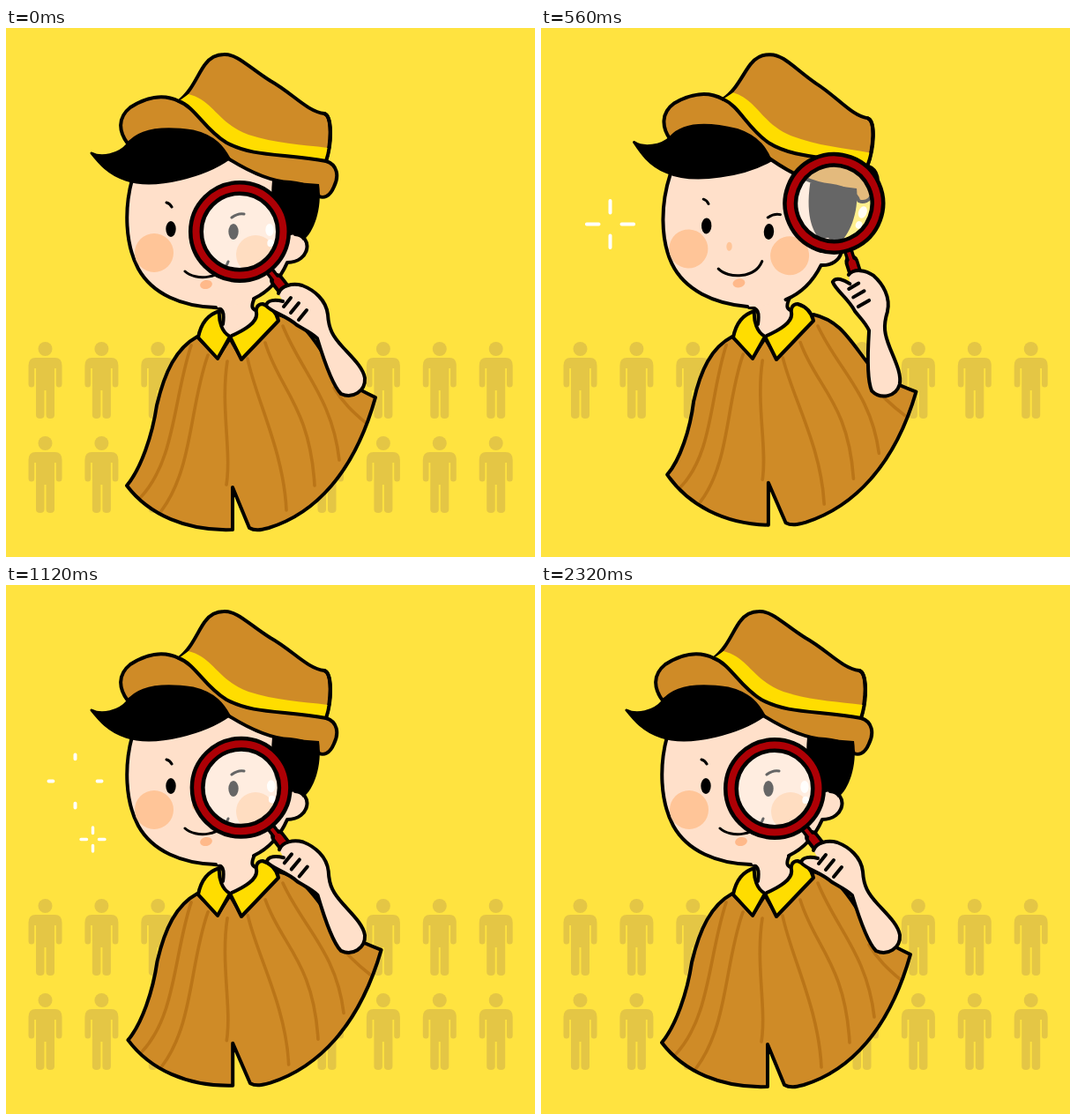
Write an HTML page that moves like this. It is 600 px wide and 600 px high and loops after 3.2 s.

```html
<!DOCTYPE html>
<html lang="en">
<head>
<meta charset="utf-8">
<title>Detective with magnifying glass</title>
<style>
  html, body { margin: 0; width: 100%; height: 100%; overflow: hidden; background: #ffe340; }
  svg { display: block; width: 100vw; height: 100vh; }
  .ink { stroke: #000; stroke-width: 4; stroke-linejoin: round; stroke-linecap: round; }
  .line { fill: none; }
  .thin { stroke-width: 3; }
  .tan { fill: #cf8b27; }
  .skin { fill: #ffe0ca; }
  .gold { fill: #ffdd00; }
  .blush { fill: #ffc598; }
  .stripe { fill: none; stroke: #ba7518; stroke-width: 3.6; stroke-linecap: round; }
  .spark { stroke: #fff; fill: none; stroke-linecap: round; }
</style>
</head>
<body>
<svg viewBox="0 0 600 600">
  <defs>
    <g id="man" fill="#e4c645">
      <circle cy="8" r="8"/>
      <path d="M-11 18 H11 Q19 18 19 27 V48 Q19 51.500 15.500 51.500 Q12.300 51.500 12.300 48 V30 H10.500 V83 Q10.500 87 5.700 87 Q1 87 1 83 V55 H-1 V83 Q-1 87 -5.700 87 Q-10.500 87 -10.500 83 V30 H-12.300 V48 Q-12.300 51.500 -15.500 51.500 Q-19 51.500 -19 48 V27 Q-19 18 -11 18 Z"/>
    </g>
    <g id="row"></g>
  </defs>

  <use id="rowA" href="#row"/>
  <use id="rowB" href="#row" y="463"/>
  <path id="spark1" class="spark" stroke-width="4"/>
  <path id="spark2" class="spark" stroke-width="3.400"/>

  <g id="cloak"></g>

  <path class="skin" d="M238 312 L247 320 L245 338 L254 352 L287 328 L280 318 L283 300 Z"/>
  <path class="ink line" d="M236 317 C246 317 248 322 246 336 M282 306 C277 317 279 319 287 322"/>
  <path class="ink gold" d="M242 321 C229 325 221 335 218 351 L240 375 L254 350 C245 345 241 333 242 321 Z"/>
  <path class="ink gold" d="M254 350 C270 343 286 334 284 323 C283 317 286 313 291 313 C301 316 307 323 309 332 L267 376 Z"/>

  <g id="face">
    <path class="skin" d="M143 170 C134 205 135 245 150 273 C166 302 200 317 240 317 C270 316 306 300 319 266 C345 266 349 236 328 234 L330 160 L200 125 Z"/>
    <path class="ink line" d="M143 172 C134 205 135 245 150 273 C166 302 200 316 238 317 M281 307 C300 298 312 282 319 266 C345 266 349 236 328 234"/>
    <circle class="blush" cx="168" cy="255" r="22"/>
    <circle class="blush" cx="283" cy="257" r="22"/>
    <ellipse class="blush" cx="214" cy="250" rx="3.200" ry="5"/>
    <ellipse cx="227" cy="291" rx="7" ry="5" fill="#ffb98a" transform="rotate(-12 227 291)"/>
    <ellipse cx="187" cy="228" rx="5.700" ry="9"/>
    <ellipse cx="258" cy="231" rx="5.700" ry="9"/>
    <path class="ink line thin" d="M182 198 Q186 199 188 203 M256 215 C260 212 265 210 270 211 M203 276 C215 287 245 285 252 265"/>
  </g>

  <g id="hat">
    <path class="ink tan" d="M138 131 C128 118 126 102 141 90 C158 79 178 74 196 83 C211 72 218 51 226 41 C232 33 239 30 247 30 C262 29 276 45 300 60 C325 74 342 95 361 97 C370 100 369 130 363 151 C376 155 378 168 372 180 C367 192 360 193 355 191 C352 182 340 177 322 175 C295 174 268 158 252 148 C230 125 175 105 138 131 Z"/>
    <path class="gold" d="M207 75 C235 82 240 108 275 121 C305 131 335 132 365 136 L363 151 C320 142 280 147 250 130 C225 115 215 90 196 83 Z"/>
    <path class="ink line" d="M196 83 C215 90 225 115 250 130 C280 147 320 142 363 151 C370 130 370 100 361 97"/>
  </g>
  <path id="side" d="M302 173 L355 177 C359 205 349 232 337 241 C331 233 323 233 318 238 C310 232 298 215 302 173 Z"/>
  <path id="hair" class="ink thin" d="M97 142 C108 148 128 144 138 132 C152 113 185 113 212 117 C238 123 247 137 253 148 C228 166 170 184 136 172 C116 166 105 152 97 142 Z"/>

  <g id="arm">
    <circle cx="265" cy="231" r="43" fill="#fff" fill-opacity=".4"/>
    <ellipse cx="299" cy="229" rx="4.700" ry="7" fill="#fff" fill-opacity=".9"/>
    <ellipse cx="300" cy="244" rx="3.700" ry="4.300" fill="#fff" fill-opacity=".9"/>
    <g class="line" stroke-linecap="round">
      <path d="M297 273 L307 286" stroke="#000" stroke-width="11"/>
      <path d="M307 286 L322 305" stroke="#000" stroke-width="16"/>
      <path d="M308 287 L322 305" stroke="#ad0005" stroke-width="8.500"/>
      <path d="M300 277 L308 287" stroke="#ad0005" stroke-width="4"/>
      <circle cx="265" cy="231" r="49.500" stroke="#000" stroke-width="17"/>
      <circle cx="265" cy="231" r="49.500" stroke="#ad0005" stroke-width="8"/>
    </g>
    <path class="ink skin" d="M309 301 C312 292 325 289 336 292 C349 297 363 308 365 325 C366 342 371 350 382 362 C393 374 405 385 407 397 C408 412 393 421 380 415 C370 405 360 375 353 352 C346 345 338 342 330 337 C318 326 302 323 295 315 C296 308 306 308 314 310"/>
    <path class="ink line" stroke-width="5" d="M323 306 L315 316 M332 312 L323 323 M341 320 L332 331"/>
  </g>
</svg>
<script>
const $ = id => document.getElementById(id);
const NS = "http://www.w3.org/2000/svg";
const STEP = 80, LAST = 2320, LOOP = 3200;

function add(parent, tag, attrs) {
  const el = document.createElementNS(NS, tag);
  for (const k in attrs) el.setAttribute(k, attrs[k]);
  return parent.appendChild(el);
}

for (let i = 0; i < 9; i++) add($("row"), "use", { href: "#man", x: 44.5 + i * 63.9 });

const body = "M217 350 C193 363 180 390 171 428 C166 462 153 500 137 519 C162 552 205 571 257 569 L257 521 L276 567 C283 571 290 569 298 567 C350 551 395 505 419 419 C400 410 385 402 372 388 C350 355 340 332 309 325 L267 374 L254 352 L240 374 Z";
const cloakShapes = [
  ["tan", body],
  ["stripe", "M210 360 C190 420 192 490 153 532"],
  ["stripe", "M229 371 C208 430 212 500 176 548"],
  ["stripe", "M251 378 C243 430 256 480 250 518"],
  ["stripe", "M274 375 C283 420 315 480 318 547"],
  ["stripe", "M294 357 C310 410 345 430 350 519"],
  ["stripe", "M314 338 C335 390 370 420 378 490"],
  ["stripe", "M372 408 C382 425 394 436 407 447"],
  ["ink line", body]
].map(([cls, d]) => ({ d, el: add($("cloak"), "path", { class: cls }) }));

// [time, value] keys joined by a sine ease
const keys = {
  arm:    [[0, 0], [400, 22.8], [1200, 0]],
  head:   [[0, 0], [400, 2.6], [720, 2.7], [1120, 0]],
  hair:   [[0, 0], [400, 4], [720, 1.4], [1120, 0]],
  hem:    [[0, 0], [720, 1], [1290, 0]],
  corner: [[0, 0], [720, 1], [960, 1.1], [1600, 0]]
};

const unit = v => Math.max(0, Math.min(1, v));

function at(name, t) {
  const k = keys[name];
  for (let i = 1; i < k.length; i++) {
    const [t0, v0] = k[i - 1], [t1, v1] = k[i];
    if (t <= t1) return v0 + (v1 - v0) * (1 - Math.cos(Math.PI * (t - t0) / (t1 - t0))) / 2;
  }
  return k[k.length - 1][1];
}

// lifts the hem and the right corner of the cloak
function warp(x, y, hem, corner) {
  const w = unit((y - 350) / 169);
  const left = Math.max(0, (257 - x) / 120);
  const right = Math.max(0, (x - 257) / 162) * Math.min(w, .41) * corner;
  return [
    x + hem * w * (1 + 6 * left) + right * 17,
    y - hem * w * (6 + 8 * left) - right * 12
  ];
}

function drawCloak(t) {
  const hem = at("hem", t), corner = at("corner", t);
  for (const s of cloakShapes) {
    s.el.setAttribute("d", s.d.replace(/(\d+) (\d+)/g, (_, x, y) =>
      warp(+x, +y, hem, corner).map(v => v.toFixed(2)).join(" ")));
  }
}

function drawSpark(el, t, cx, cy, r0, r1) {
  const on = t > 0 && t < 1120;
  el.style.display = on ? "" : "none";
  if (!on) return;
  const b = r0 + (r1 - r0) * unit(t / 400);
  const a = Math.min(b - .01, r0 + (r1 - r0) * unit((t - 480) / 560));
  el.setAttribute("d", [[1, 0], [-1, 0], [0, 1], [0, -1]].map(([x, y]) =>
    `M${cx + x * a} ${cy + y * a}L${cx + x * b} ${cy + y * b}`).join(""));
}

function drawRows(t) {
  const u = t % 1600;
  const sliding = t > 0 && t < LAST && u < 720;
  $("rowA").setAttribute("y", sliding ? 463 - 107 * unit(u / 560) : 356);
  $("rowB").style.display = sliding ? "none" : "";
}

function turn(id, deg, x, y) {
  $(id).setAttribute("transform", `rotate(${deg} ${x} ${y})`);
}

function draw(t) {
  const head = at("head", t);
  drawRows(t);
  drawSpark($("spark1"), t - 240, 78.5, 222.5, 13, 30);
  drawSpark($("spark2"), t - 640, 98.5, 288.5, 7, 13.5);
  drawCloak(t);
  turn("face", head * 1.1, 258, 240);
  turn("side", head * 1.1, 258, 240);
  turn("hat", head, 250, 310);
  $("hair").setAttribute("transform",
    `rotate(${head} 250 310) rotate(${at("hair", t)} 215 148)`);
  turn("arm", at("arm", t), 387, 400);
}

const start = performance.now();
let shown = -1;
function tick() {
  const ms = Math.max(0, performance.now() - start) % LOOP;
  const t = Math.min(LAST, Math.floor(ms / STEP) * STEP);
  if (t !== shown) draw(shown = t);
  requestAnimationFrame(tick);
}
tick();
</script>
</body>
</html>
```
